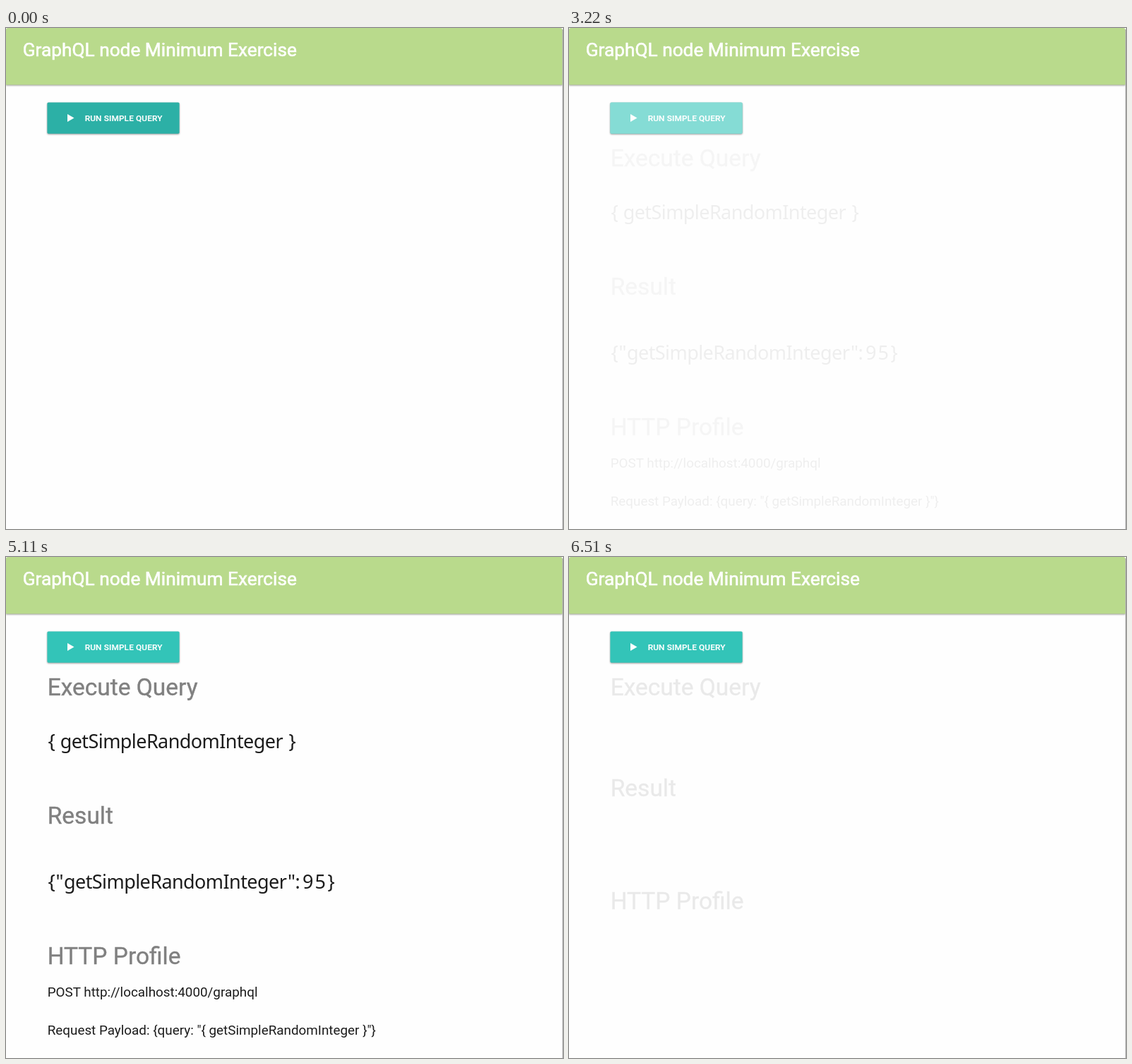
Write an HTML page that moves like this. It is 789x710 px and loops after 6.58 s.

```html
<!DOCTYPE html>
<html lang="en">
<head>
<meta charset="utf-8">
<title>GraphQL node Minimum Exercise</title>
<style>
  html, body { margin: 0; width: 100%; height: 100%; overflow: hidden; background: #fefefe; }
  svg { display: block; font-family: Roboto, sans-serif; white-space: pre; }
  .raised { filter: drop-shadow(0 1px 1px rgba(0, 0, 0, .4)); }
  .title { font-size: 26.25px; fill: #fff; stroke: #fff; stroke-width: .6; }
  .label { font-size: 11.8px; font-weight: 500; letter-spacing: .15px; fill: #fff; stroke: #fff; stroke-width: .2; }
  .heading { font-size: 33.5px; fill: #808080; stroke: #808080; stroke-width: .4; }
  .code { font: 27px "Noto Sans", sans-serif; letter-spacing: -.58px; }
  .line { font-size: 18.85px; }
  #details { fill: #1c1c1c; }
</style>
</head>
<body>
<svg width="789" height="710" viewBox="0 0 789 710">
  <clipPath id="buttonShape"><rect x="58.4" y="105.4" width="187.2" height="44.4" rx="1.7"/></clipPath>

  <path class="raised" fill="#b9da8c" d="M0 80.6V3Q0 0 3 0H785Q788 0 788 3V80.6Z"/>
  <text class="title" x="23.7" y="40">GraphQL node Minimum Exercise</text>
  <path d="M788.5 2V710" stroke="#b0b0b0"/>

  <rect id="button" class="raised" x="58.4" y="105.4" width="187.2" height="44.4" rx="1.7"/>
  <g clip-path="url(#buttonShape)"><circle id="ripple" cx="152" cy="127" fill="#fff"/></g>
  <path d="M87 122L96.5 127.5L87 133Z" fill="#fff"/>
  <text class="label" x="111.7" y="131.6">RUN SIMPLE QUERY</text>

  <g id="content">
    <text class="heading" x="58.7" y="196">Execute Query</text>
    <text class="heading" id="result" x="58.7">Result</text>
    <text class="heading" id="profile" x="58.7">HTTP Profile</text>
    <g id="details">
      <g class="code">
        <text x="59.5" y="271">{</text>
        <text x="76.7" y="271">getSimpleRandomInteger</text>
        <text x="400.5" y="271">}</text>
        <text x="59.5" y="470">{</text>
        <text x="70.5" y="470">"</text>
        <text x="82" y="470">getSimpleRandomInteger</text>
        <text x="399" y="470">":</text>
        <text x="420" y="470" style="letter-spacing:2px">95</text>
        <text x="455.5" y="470">}</text>
      </g>
      <text class="line" x="58.7" y="623">POST http://localhost:4000/graphql</text>
      <text class="line" x="58.7" y="677">Request Payload: {query: "{ getSimpleRandomInteger }"}</text>
    </g>
  </g>
</svg>
<script>
  const LOOP = 6580, STEP = 70;
  const HOVER = 2780, CLICKS = [2820, 5210];
  const SHOW = 2935, CLEAR = 5150, HOLD = 6370;
  const el = id => document.getElementById(id);
  const clamp = v => Math.max(0, Math.min(1, v));

  // Timing curve with control points (x1, 0) and (x2, 1), solved by bisection.
  const curve = (x1, x2) => progress => {
    const x = clamp(progress);
    let lo = 0, hi = 1;
    for (let i = 0; i < 24; i++) {
      const s = (lo + hi) / 2, r = 1 - s;
      if (3 * r * r * s * x1 + 3 * r * s * s * x2 + s ** 3 < x) lo = s; else hi = s;
    }
    return lo * lo * (3 - 2 * lo);
  };
  const easeOut = curve(0, .58), easeInOut = curve(.42, .58);

  function drawRipple(t) {
    const start = CLICKS.findLast(c => c <= t) ?? -LOOP;
    const age = t - start;
    el('ripple').setAttribute('r', 188 * easeOut(age / 750));
    el('ripple').setAttribute('opacity', .45 * (1 - easeOut((age - 350) / 750)));
  }

  function drawButton(t) {
    const h = easeOut((t - HOVER) / 200);
    const mix = (a, b) => a + (b - a) * h;
    el('button').setAttribute('fill', `rgb(${mix(44, 51)},${mix(176, 196)},${mix(166, 184)})`);
  }

  function drawContent(t) {
    const cleared = t > CLEAR;
    const opacity = cleared
      ? 1 - easeInOut((Math.min(t, HOLD) - CLEAR) / 1680)
      : easeInOut((t - SHOW) / 1600);
    el('content').setAttribute('opacity', opacity);
    el('details').setAttribute('visibility', cleared ? 'hidden' : 'visible');
    el('result').setAttribute('y', cleared ? 339 : 378);
    el('profile').setAttribute('y', cleared ? 499 : 577);
  }

  const origin = performance.now();
  function frame() {
    const elapsed = (performance.now() - origin) % LOOP;
    const t = Math.floor(elapsed / STEP) * STEP;
    drawButton(t);
    drawRipple(t);
    drawContent(t);
    requestAnimationFrame(frame);
  }
  frame();
</script>
</body>
</html>
```
